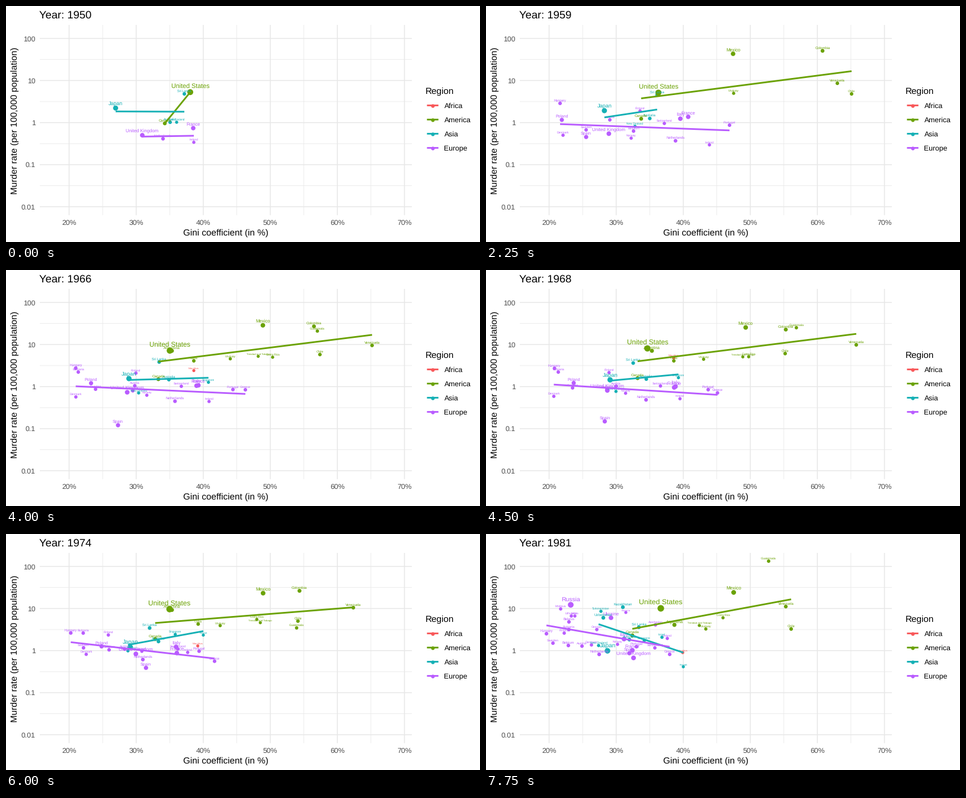
A matplotlib script that plays this animation: 800 px wide and 400 px high, repeating every 8 s.

```python
import matplotlib.pyplot as plt
import numpy as np
from matplotlib.animation import FuncAnimation

plt.rcParams["font.family"] = "Liberation Sans"
plt.rcParams["text.hinting"] = "none"

W, H = 800, 400
PT = 0.72  # points per pixel at 100 dpi
FIRST, LAST = 50, 81
COLORS = {"Africa": "#F8585A", "America": "#6BA204",
          "Asia": "#15B0B5", "Europe": "#B95CFF"}
GROWTH = {"Africa": 2.1, "America": 1.5, "Asia": 1.5, "Europe": 1.2}
LEAD = 2  # years a country is shown before it starts moving
countries = []


def track(region, name, pop, first, *points, last=LAST):
    """Add a country: population in millions and stage points evenly spaced in time."""
    times = np.linspace(first, last, len(points))
    countries.append((name, region, pop, times, np.array(points).T))


track("Africa", "Egypt", 20, 77, (199, 173), last=77)
track("Africa", "Mauritius", 0.5, 63, (317, 203), (317, 138), (325, 200), (332, 201))

track("America", "Argentina", 18, 68, (280, 137), (280, 128), (318, 154))
track("America", "Canada", 15, 50, (268, 199), (247, 172))
track("America", "Chile", 7, 59, (617, 149), (480, 140), (515, 161))
track("America", "Colombia", 14, 59, (568, 76), (506, 101), (490, 94), last=77)
track("America", "Costa Rica", 1.4, 63, (460, 149), (400, 142))
track("America", "Cuba", 6, 68, (317, 154), (328, 152), last=77)
track("America", "Guatemala", 4, 63, (528, 112), (523, 95), (484, 172), (477, 46))
track("America", "Mexico", 40, 59, (417, 81), (443, 101), (418, 99))
track("America", "Trinidad and Tobago", 0.8, 63, (414, 145), (449, 149), (360, 155))
track("America", "United States", 152, 50, (311, 146), (288, 147), (267, 128), (295, 126))
track("America", "Uruguay", 2, 59, (418, 148), (356, 152), (371, 161))
track("America", "Venezuela", 8, 59, (593, 131), (632, 126), (506, 123))

track("Asia", "Australia", 9, 50, (277, 197), (276, 186), (242, 179))
track("Asia", "Israel", 2.5, 77, (263, 181), (297, 175))
track("Asia", "Japan", 80, 50, (185, 173), (202, 178), (212, 189), (205, 198))
track("Asia", "Kazakhstan", 10, 81, (231, 124))
track("Asia", "Kuwait", 0.8, 72, (333, 156), (333, 225))
track("Asia", "New Zealand", 2, 50, (288, 197), (225, 209), (190, 189))
track("Asia", "Singapore", 1.5, 63, (367, 202), (291, 167), (267, 181))
track("Asia", "Sri Lanka", 9, 50, (301, 149), (287, 151), (235, 160), (258, 158))
track("Asia", "Turkmenistan", 2, 81, (194, 131))
track("Asia", "Uzbekistan", 11, 81, (198, 142))

track("Europe", "Austria", 7, 59, (209, 193), (222, 198), (162, 190))
track("Europe", "Azerbaijan", 5, 81, (286, 154))
track("Europe", "Belarus", 8, 81, (140, 149))
track("Europe", "Belgium", 8, 59, (249, 212), (139, 189))
track("Europe", "Bulgaria", 7, 68, (122, 173), (140, 162))
track("Europe", "Denmark", 4, 59, (130, 219), (111, 213), (178, 188))
track("Europe", "Estonia", 1, 81, (236, 133))
track("Europe", "Finland", 4, 59, (260, 178), (132, 168))
track("Europe", "France", 43, 50, (316, 207), (345, 185), (308, 204), (247, 197))
track("Europe", "Georgia", 4, 81, (187, 162))
track("Europe", "Greece", 8, 63, (424, 195), (364, 219), (310, 204))
track("Europe", "Hungary", 9, 59, (125, 165), (102, 169))
track("Europe", "Ireland", 3, 50, (317, 231), (386, 236), (307, 212), (306, 177))
track("Europe", "Italy", 46, 59, (328, 191), (318, 199), (233, 178))
track("Europe", "Latvia", 2, 81, (150, 139))
track("Europe", "Lithuania", 3, 81, (144, 139))
track("Europe", "Moldova", 3, 81, (126, 127))
track("Europe", "Netherlands", 11, 50, (265, 225), (328, 229), (250, 217), (191, 204))
track("Europe", "Norway", 3, 59, (245, 224), (222, 187))
track("Europe", "Poland", 27, 59, (128, 193), (168, 190), last=77)
track("Europe", "Portugal", 8, 59, (411, 202), (367, 203), (254, 191))
track("Europe", "Russia", 115, 81, (143, 120))
track("Europe", "Spain", 30, 59, (169, 222), (190, 265), (236, 228), (242, 202))
track("Europe", "Sweden", 7, 59, (169, 210), (113, 185))
track("Europe", "Switzerland", 5, 59, (301, 199), (285, 193))
track("Europe", "Ukraine", 42, 81, (211, 142))
track("Europe", "United Kingdom", 50, 50, (230, 219), (204, 216), (205, 200), (249, 210))

countries.sort(key=lambda c: c[0])

fig = plt.figure(figsize=(W / 100, H / 100), dpi=100, facecolor="white")
ax = fig.add_axes([0, 0, 1, 1])
ax.set_xlim(0, W)
ax.set_ylim(H, 0)
ax.axis("off")


def label(x, y, text, size, color="black", ha="left", rotation=0):
    return ax.text(x, y, text, fontsize=size * PT, color=color, ha=ha, va="baseline",
                   rotation=rotation, rotation_mode="anchor", zorder=4)


def stroke(xs, ys, color, width, z):
    return ax.plot(xs, ys, color=color, lw=width * PT, solid_capstyle="butt",
                   snap=False, zorder=z)[0]


def dots(xs, ys, radii, colors):
    sizes = (2 * np.asarray(radii) * PT) ** 2
    return ax.scatter(xs, ys, s=sizes, c=colors, linewidths=0, snap=False, zorder=3)


def draw_frame():
    left, right, top, bottom = 57, 685, 32, 354.5
    for i in range(11):
        major = i % 2 == 0
        width = 1.45 if major else 0.75
        x = 106.5 + 56.6 * i
        if x < right:
            stroke([x, x], [top, bottom], "#E7E7E7", width, 1)
            if major:
                label(x, 371, f"{20 + 5 * i}%", 12.2, "#4D4D4D", "center")
        y = 55 + 35.66 * i
        if y < bottom:
            stroke([left, right], [y, y], "#E7E7E7", width, 1)
            if major:
                label(49.5, y + 4.4, f"{10 ** (2 - i // 2):g}", 12.2, "#4D4D4D", "right")
    label(371, 389, "Gini coefficient (in %)", 15.25, ha="center")
    label(18.5, 194, "Murder rate (per 100,000 population)", 15.3, ha="center", rotation=90)
    label(708, 148.5, "Region", 15.2)
    for i, (region, color) in enumerate(COLORS.items()):
        y = 168.5 + 24 * i
        stroke([710.5, 729.8], [y, y], color, 2.85, 2)
        dots([720.2], [y], [3.1], [color])
        label(739.5, y + 4.4, region, 12.2)


draw_frame()
title = label(56.5, 21, "", 18.4)
artists = []


def update(i):
    while artists:
        artists.pop().remove()
    year = FIRST + i
    title.set_text(f"Year: {1900 + year}")
    groups = {region: [] for region in COLORS}
    xs, ys, radii, colors = [], [], [], []
    for name, region, pop, times, points in countries:
        if not times[0] - LEAD <= year <= times[-1] + 1:
            continue
        x, y = (np.interp(year, times, p) for p in points)
        size = 3.85 + 0.56 * np.sqrt(pop * GROWTH[region] ** (i / (LAST - FIRST)))
        groups[region].append((x, y))
        xs.append(x)
        ys.append(y)
        radii.append(0.375 * size + 0.95)
        colors.append(COLORS[region])
        artists.append(label(x, y - 0.57 * size, name, size, COLORS[region], "center"))
    artists.append(dots(xs, ys, radii, colors))
    for region, spots in groups.items():
        if len(spots) > 1:
            gx, gy = np.array(spots).T
            slope, base = np.polyfit(gx, gy, 1)
            ends = np.array([gx.min(), gx.max()])
            artists.append(stroke(ends, base + slope * ends, COLORS[region], 2.85, 5))
    return artists


anim = FuncAnimation(fig, update, frames=LAST - FIRST + 1, init_func=lambda: [],
                     interval=250, repeat=True, repeat_delay=0, blit=False)
plt.show()
```
